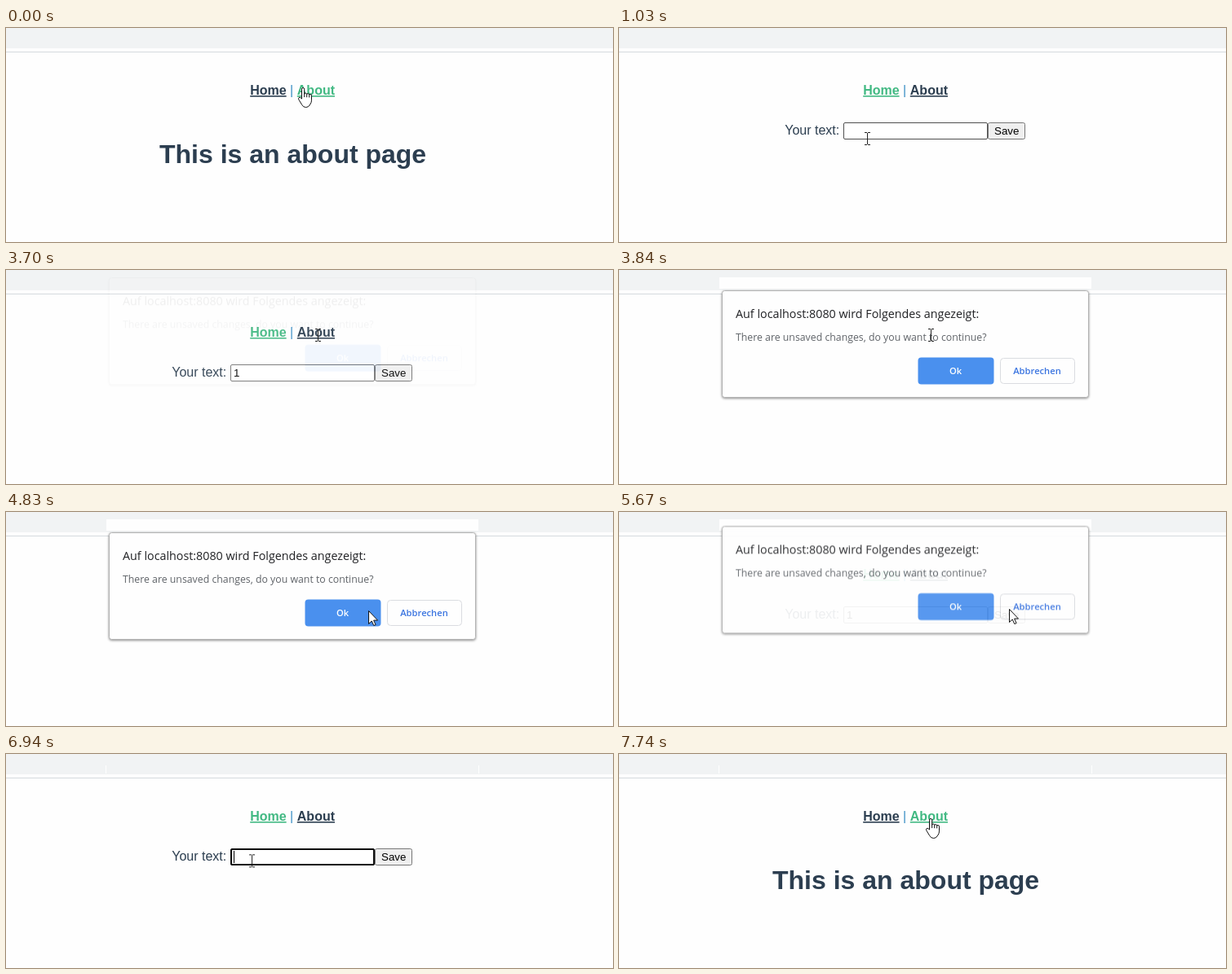
Write an HTML page that moves like this. It is 744 px wide and 263 px high and loops after 8000 ms.

```html
<!DOCTYPE html>
<html lang="en">
<head>
<meta charset="utf-8">
<title>Unsaved changes</title>
<style>
html, body { margin: 0; width: 100%; height: 100%; overflow: hidden; background: #fefefe; }
svg { display: block; width: 744px; height: 263px; }
text { font-family: "Liberation Sans", Arial, sans-serif; font-size: 16px; fill: #2c3e50; white-space: pre; }
.link { font-weight: bold; text-decoration: underline; }
.active { fill: #42b983; }
.title { font-size: 32px; font-weight: bold; }
.control { font-size: 13.333px; fill: #000; }

/* Everything switches hard except the cursor path and the dialog */
.home, .about, .value, .caret, .focus, .field, .press, .patch, .ticks, .hand, .arrow, .beam {
  animation: 8s step-end infinite;
}
.home { animation-name: home; }
.about { animation-name: about; }
.value { animation-name: value; }
.caret { animation-name: caret; }
.focus { animation-name: focus; }
.field { animation-name: field; }
.press { animation-name: press; }
.patch { animation-name: patch; }
.ticks { animation-name: ticks; }
.hand { animation-name: hand; }
.arrow { animation-name: arrow; }
.beam { animation-name: beam; }
.cursor { animation: move 8s ease-in-out infinite; }
.dialog { animation: dialog 8s linear infinite; }

.dialog text { font-family: "Open Sans", "Noto Sans", sans-serif; }
.dialog .head { font-size: 14.3px; fill: #202124; }
.dialog .body { font-size: 12.3px; fill: #5f6368; }
.dialog .label { font-size: 11.2px; font-weight: 600; text-anchor: middle; }
.sheet { fill: #fefefe; stroke: #b2b2b2; filter: drop-shadow(0 1px 1.5px rgba(0, 0, 0, .45)); }

@keyframes home { 0%, 96.625%, 100% { opacity: 0 } 6.5% { opacity: 1 } }
@keyframes about { 0%, 96.625%, 100% { opacity: 1 } 6.5% { opacity: 0 } }
@keyframes value { 0%, 85.75%, 100% { opacity: 0 } 36.25% { opacity: 1 } }
@keyframes caret {
  0%, 29.25%, 92%, 100% { opacity: 0; transform: none }
  23.125%, 85.75% { opacity: 1; transform: none }
  36.25%, 79.5% { opacity: 1; transform: translateX(7px) }
  42.5% { opacity: 0; transform: translateX(7px) }
}
@keyframes focus { 0%, 45.75%, 95.625%, 100% { opacity: 0 } 22.875%, 79% { opacity: 1 } }
@keyframes field { 0%, 40%, 87.5%, 100% { stroke: #767676 } 11.5%, 72.5% { stroke: #4f4f4f } }
@keyframes press { 0%, 68.5%, 100% { fill: #fefefe } 67.125% { fill: #e9effc } }
@keyframes patch { 0%, 71.75%, 100% { opacity: 0 } 47% { opacity: 1 } }
@keyframes ticks { 0%, 100% { opacity: 0 } 72.375% { opacity: 1 } }
@keyframes hand { 0%, 91.25%, 100% { opacity: 1 } 9.875% { opacity: 0 } }
@keyframes arrow {
  0%, 11.375%, 72.125%, 91.25%, 100% { opacity: 0 }
  9.875%, 51.5%, 88.75% { opacity: 1 }
}
@keyframes beam {
  0%, 51.5%, 88.75%, 100% { opacity: 0 }
  11.375%, 72.125% { opacity: 1 }
}
@keyframes dialog {
  0%, 46.125% { opacity: 0; transform: translateY(-17px) }
  48%, 70.25% { opacity: 1; transform: none }
  70.875% { opacity: .93; transform: translateY(-7.5px) }
  72.375%, 100% { opacity: 0; transform: translateY(-25px) }
}
@keyframes move {
  0%, 2.75% { transform: translate(364px, 74px) }
  3.75%, 8.75% { transform: translate(332px, 74px) }
  12.875%, 22.625% { transform: translate(304px, 136px) }
  23.125%, 39.125% { transform: translate(304px, 139px) }
  45.5%, 51.5% { transform: translate(382px, 80px) }
  60.375% { transform: translate(444px, 121px) }
  61.375%, 61.75% { transform: translate(467px, 120px) }
  64.625%, 71.875% { transform: translate(478px, 119px) }
  73% { transform: translate(443px, 135px) }
  76.375%, 78.875% { transform: translate(300px, 135px) }
  79.75%, 86.25% { transform: translate(300px, 132px) }
  92.625%, 100% { transform: translate(382px, 80px) }
}
</style>
</head>
<body>
<svg viewBox="0 0 744 263">
  <rect width="744" height="25" fill="#f1f3f4"/>
  <rect y="29" width="744" height="1" fill="#d5dade"/>
  <rect class="patch" x="123" y="9" width="456" height="14" fill="#fefefe"/>
  <path class="ticks" d="M122.5 14v10M579.5 14v10" stroke="#fefefe"/>

  <text x="348.1" y="82" style="fill:#3a8fc4">|</text>

  <g class="about">
    <text class="link" x="299.2" y="82">Home</text>
    <text class="link active" x="356.8" y="82">About</text>
    <text class="title" x="188" y="166">This is an about page</text>
  </g>

  <g class="home">
    <text class="link active" x="299.2" y="82">Home</text>
    <text class="link" x="356.8" y="82">About</text>
    <text x="203.2" y="131">Your text:</text>
    <rect class="field" x="275.5" y="116.5" width="176" height="20" rx="1.5" fill="#fff"/>
    <rect class="focus" x="276" y="117" width="175" height="19" rx="1.5" fill="none" stroke="#101010" stroke-width="2"/>
    <text class="control value" x="279" y="131">1</text>
    <rect class="caret" x="279" y="119" width="1" height="15"/>
    <rect x="452.5" y="116.5" width="45" height="20" rx="2" fill="#efefef" stroke="#767676"/>
    <text class="control" x="460" y="131">Save</text>
  </g>

  <g class="dialog">
    <rect class="sheet" x="126.5" y="25.5" width="449" height="131" rx="3"/>
    <text class="head" x="143" y="59">Auf localhost:8080 wird Folgendes angezeigt:</text>
    <text class="body" x="143" y="87">There are unsaved changes, do you want to continue?</text>
    <rect x="366.5" y="107.5" width="93" height="33" rx="4" fill="#4a90ee"/>
    <text class="label" x="412.5" y="128" style="fill:#fff">Ok</text>
    <rect class="press" x="467.5" y="108.5" width="91" height="31" rx="4" stroke="#dadce0"/>
    <text class="label" x="512.5" y="128" style="fill:#3a74e0">Abbrechen</text>
  </g>

  <g class="cursor">
    <g class="hand" transform="translate(-6 -1)" fill="#fff" stroke="#111" stroke-linejoin="round">
      <path d="M4.5 14V2.2q0-1.7 1.6-1.7t1.6 1.7v6q0-1.2 1.5-1.2t1.5 1.6q0-1 1.5-1t1.5 1.8q0-.9 1.4-.9t1.4 1.7v5.6q0 3-1.8 5.2-1.6 3.5-5 3.5-3.6 0-5-3.2L1.2 15.6q-1.4-2.2-.2-3t2.2.2z"/>
      <path d="M7.7 8v4M10.7 8.6v3.6M13.7 9.4v3" fill="none"/>
    </g>
    <path class="arrow" d="M.5.5v16l3.7-3.5 2.6 5.6 2.3-1-2.5-5.5h4.9z" fill="#fff" stroke="#111"/>
    <path class="beam" d="M-3-7.5h3m1 0h3M.5-7V7M-3 7.5h3m1 0h3" fill="none" stroke="#222"/>
  </g>
</svg>
</body>
</html>
```
